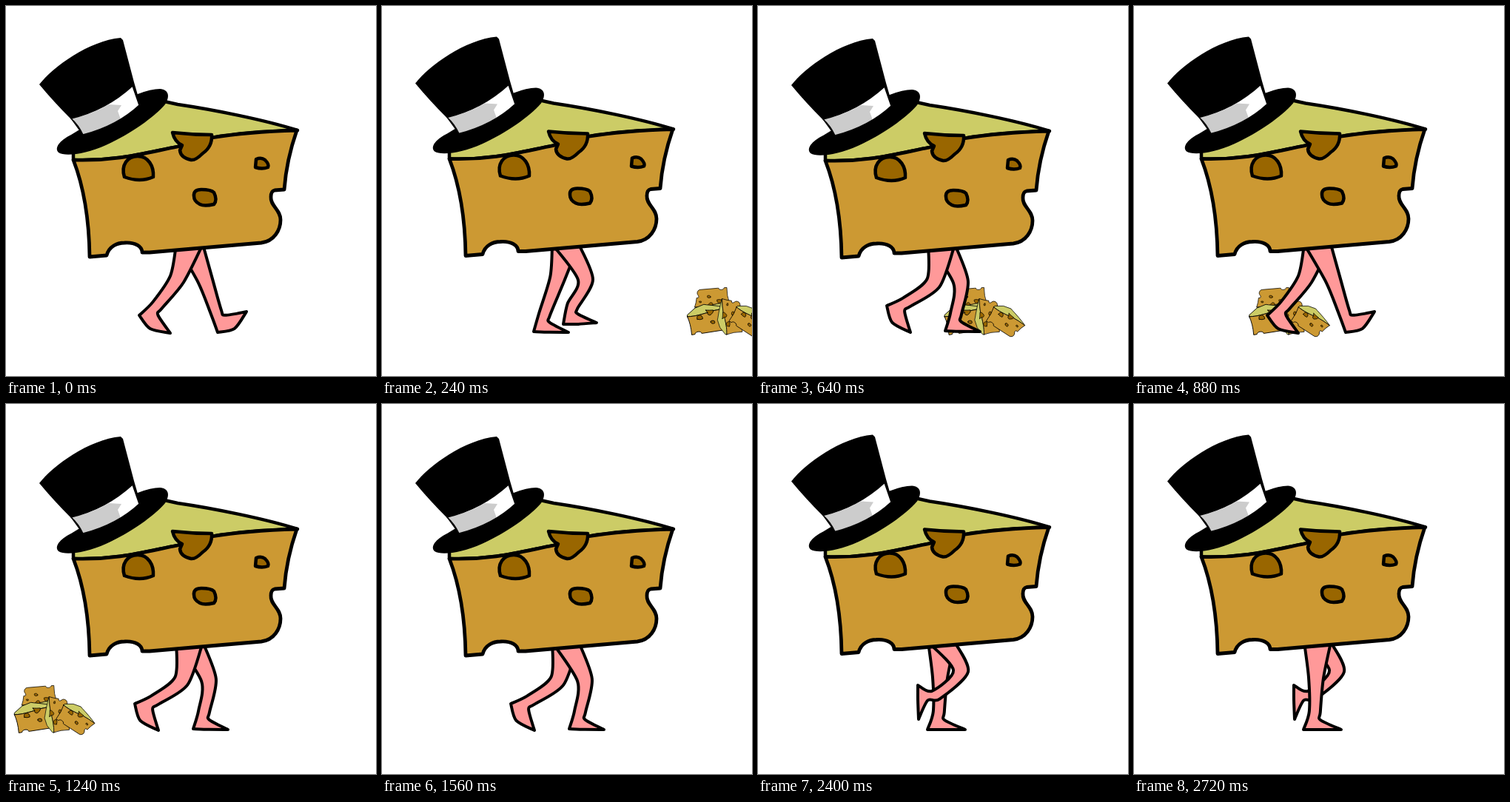
Animation, 500 px wide and 500 px high, one loop 2.8 s. Source, as an HTML page with a canvas:

```html
<!DOCTYPE html>
<html lang="en">
<head>
<meta charset="utf-8">
<title>Walking cheese</title>
<style>
  html, body { margin: 0; width: 100%; height: 100%; overflow: hidden; background: #fff; }
  canvas { display: block; width: 500px; height: 500px; }
</style>
</head>
<body>
<canvas id="stage" width="500" height="500"></canvas>
<script>
const ctx = document.getElementById('stage').getContext('2d');
const LOOP = 2800, TICK = 40, POSE = 80, HEAP_STEP = 16.05;
const RIND = '#cc9933', TOP = '#cccc66', HOLE = '#996600', SKIN = '#ff9999';
const HIP = [248, 322];

// Key poses of one leg through a stride: knee, heel, toe.
const stride = {
  contact: [[269, 370], [286, 441], [325, 413]],
  flat: [[274, 373], [253, 439], [300, 440]],
  pass: [[246, 370], [229, 440], [280, 440]],
  late: [[237, 368], [205, 440], [252, 441]],
  push: [[231, 369], [180, 418], [222, 442]],
  trail: [[237, 374], [174, 405], [206, 441]],
  raised: [[274, 361], [216, 380], [217, 426]],
  swing: [[275, 370], [245, 430], [290, 428]]
};
const farWalk = ['contact', 'flat', 'pass', 'late', 'push', 'trail', 'raised'];
const nearWalk = ['push', 'trail', 'raised', 'swing', 'contact', 'flat', 'pass'];

const along = (p, dir, d) => [p[0] + dir[0] * d, p[1] + dir[1] * d];
const backOf = ([x, y]) => [-y, x];

function direction(a, b) {
  const dx = b[0] - a[0], dy = b[1] - a[1], len = Math.hypot(dx, dy);
  return [dx / len, dy / len];
}

// Continues the path through the points; its ends stay sharp.
function smoothTo(path, pts) {
  const k = 1 / 7;
  for (let i = 0; i < pts.length - 1; i++) {
    const a = pts[i], b = pts[i + 1];
    const before = pts[i - 1] || a, after = pts[i + 2] || b;
    path.bezierCurveTo(
      a[0] + (b[0] - before[0]) * k, a[1] + (b[1] - before[1]) * k,
      b[0] - (after[0] - a[0]) * k, b[1] - (after[1] - a[1]) * k, b[0], b[1]);
  }
}

function legPath([knee, heel, toe]) {
  const sole = direction(heel, toe);
  const up = [sole[1], -sole[0]];
  const length = Math.hypot(toe[0] - heel[0], toe[1] - heel[1]);
  const onFoot = (part, lift) => along(along(heel, sole, length * part), up, lift);
  const ankle = onFoot(0.3, 24);
  const shin = direction(knee, ankle), thigh = direction(HIP, knee);
  const kneeBack = backOf(direction([0, 0], [shin[0] + thigh[0], shin[1] + thigh[1]]));
  const ankleBack = backOf(shin);
  const bulge = 0.4 * length * Math.abs(sole[0] * sole[1]);

  const path = new Path2D();
  const hipBack = along(HIP, [-1, 0], 18);
  path.moveTo(...hipBack);
  smoothTo(path, [hipBack, along(knee, kneeBack, 10), along(ankle, ankleBack, 7.5), heel]);
  smoothTo(path, [heel, onFoot(0.45, -bulge), toe]);
  smoothTo(path, [toe, onFoot(0.45, 13), along(ankle, ankleBack, -7.5),
    along(knee, kneeBack, -10), along(HIP, [1, 0], 18)]);
  return path;
}

function shape(path, fill, width) {
  const p = typeof path === 'string' ? new Path2D(path) : path;
  if (fill) { ctx.fillStyle = fill; ctx.fill(p); }
  if (width) { ctx.lineWidth = width; ctx.stroke(p); }
}

function drawCheese() {
  const frontEdge = 'Q325,170 278,178 L232,190 C190,198 150,210 91,208Z';
  shape('M91,208 L91,196 L150,150 L214,129 L232,133 C280,140 350,154 394,168 ' + frontEdge, TOP, 4.5);
  shape('M91,208 Q112,262 113,339 L136,337 C139,325 150,320 160,320 C175,319 184,325 184,333 L194,333 ' +
    'L345,320 C362,318 371,303 371,289 C371,275 357,270 358,258 Q358,250 363,249 L376,248 Q379,208 393,168 ' +
    frontEdge, RIND, 4.8);
  shape('M225,171 Q252,174 278,174 Q279,190 266,199 Q256,209 250,208 Q236,205 235,195 L238,188 Q228,184 225,171Z', HOLE, 4.5);
  shape('M160,231 C155,215 164,203 178,203 C192,203 200,216 199,231 Q181,239 160,231Z', HOLE, 4.5);
  shape('M254,257 Q253,248 264,248 Q277,248 281,252 Q286,262 281,268 Q268,271 262,268 Q254,264 254,257Z', HOLE, 4.5);
  shape('M338,207 Q345,204 350,208 Q356,214 354,218 Q346,221 337,218Z', HOLE, 4.5);
}

function drawHat() {
  const band = 'M88,152 Q135,141 171,108 L180,134 Q150,162 104,174 Q98,161 88,152Z';
  shape('M88,174 C72,182 65,192 71,198 C80,204 108,200 135,188 C170,172 199,151 215,133 C222,122 220,113 208,112 Q196,112 178,119Z', '#000');
  shape('M45,106 C64,82 112,47 155,43 L158,46 L173,103 L182,134 Q150,164 104,175 L88,153 Q64,129 45,106Z', '#000');
  shape(band, '#fff');
  shape('M88,152 Q116,147 139,133 L156,134 L151,142 L155,153 Q130,167 104,174 Q98,161 88,152Z', '#cccccc');
  shape(band, null, 1.5);
}

function drawSmallCheese(x, y, degrees, scale) {
  ctx.save();
  ctx.translate(x, y);
  ctx.rotate(degrees * Math.PI / 180);
  ctx.scale(scale, scale);
  ctx.translate(-240, -235);
  drawCheese();
  ctx.restore();
}

function drawHeap() {
  drawSmallCheese(366, 396.5, 180, 0.155);
  drawSmallCheese(361, 423, -4, 0.19);
  drawSmallCheese(390, 420, -90, 0.16);
  drawSmallCheese(415, 425, 38, 0.16);
}

function draw(time) {
  const pose = Math.floor(time / POSE) % 7;
  const tick = Math.floor(time / TICK);
  const landed = pose % 4 === 1;
  ctx.fillStyle = '#fff';
  ctx.fillRect(0, 0, 500, 500);
  ctx.strokeStyle = '#000';
  ctx.lineJoin = ctx.lineCap = 'round';

  ctx.save();
  ctx.translate((11 - tick) * HEAP_STEP, 0);
  drawHeap();
  ctx.restore();

  shape(legPath(stride[farWalk[pose]]), SKIN, 4);
  shape(legPath(stride[nearWalk[pose]]), SKIN, 4);

  ctx.save();
  ctx.translate(0, landed ? 1 : pose ? -1.5 : 0);
  drawCheese();
  drawHat();
  ctx.restore();
}

const start = performance.now();
function frame() {
  draw((performance.now() - start) % LOOP);
  requestAnimationFrame(frame);
}
frame();
</script>
</body>
</html>
```
